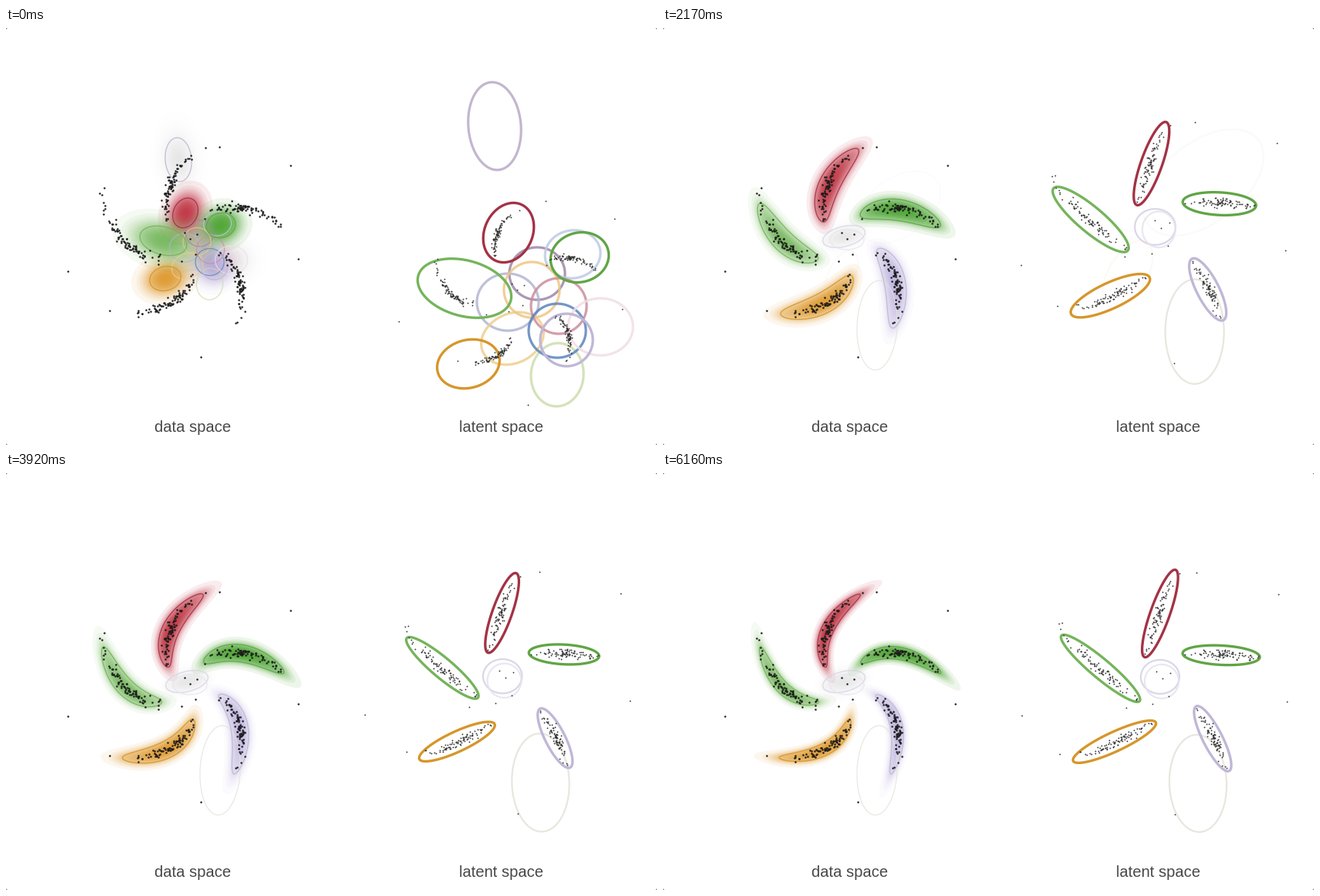
Recreate the animation shown at these times as a matplotlib script. Size 842x540 px, loop 6230 ms.

```python
import numpy as np
import matplotlib.pyplot as plt
from matplotlib.animation import FuncAnimation
from matplotlib.collections import PolyCollection
from matplotlib.colors import to_rgb
from matplotlib.patches import Polygon

# Plane points are complex numbers, x + iy with y pointing down.
W, H, DPI = 842, 540, 100
FRAMES, STEP = 89, 70
SETTLE = 18                      # frames of the fast first phase
PX = 72 / DPI
DATA = 237 + 280j                # hub of the pinwheel
LATENT = np.array([660 + 346j, 640 + 252j, 645 + 274j])  # its begin, fit, end
LEVELS = 24
RADII = np.sqrt(-2 * np.log((np.arange(LEVELS) + .5) / LEVELS))
CIRCLE = np.exp(1j * np.linspace(0, 2 * np.pi, 64, endpoint=False))
rng = np.random.default_rng(7)


def turn(degrees):
    return np.exp(1j * np.radians(degrees))


def mix(a, b, k):
    return a + (b - a) * k


def xy(z):
    return np.column_stack([z.real, z.imag])


def clock(frame):
    """Weights of the quick fit, the slow drift after it, and the time left over."""
    fit = 1 - max(0, 1 - frame / SETTLE) ** 2.2
    late = max(0, frame - SETTLE)
    return fit, 1 - np.exp(-late / 12), late / (FRAMES - 1 - SETTLE)


def spiral(r, arm=0):
    """Pinwheel offset from the hub at radius r."""
    return r * turn(-156 + .6 * r + 72 * arm)


def ellipse(cx, cy, a, b, degrees=0):
    return np.array([cx, cy, a, b, degrees], float)


def spine(e):
    """Ellipse as inner end, middle, outer end and half width."""
    mid, axis = e[0] + 1j * e[1], e[2] * turn(e[4])
    return np.array([mid - axis, mid, mid + axis, e[3]])


def halved(e):
    """Data-space image of a starting ellipse in latent space."""
    mid = DATA + (e[0] + 1j * e[1] - LATENT[0]) / 2
    return ellipse(mid.real, mid.imag, e[2] / 2, e[3] / 2, e[4])


def banana(row, r=1, stretch=1):
    """Ellipse of relative size r, bent along its spine."""
    p0, pm, p1, width = row
    half, bow = (p1 - p0) / 2, (p0 + p1) / 2 - pm
    u = (min(r, 1) + stretch * max(r - 1, 0)) * CIRCLE.real
    tangent = half + 2 * u * bow
    normal = 1j * tangent / (abs(tangent) + 1e-9)
    return xy(pm + u * half + u ** 2 * bow + width * r * CIRCLE.imag * normal)


class Arm:
    """One blade of the pinwheel with the component that fits it."""
    count = 86

    def __init__(self, k, ink, fill, peak, begin, fit, end, size, angle):
        self.k, self.ink, self.fill, self.peak = k, to_rgb(ink), to_rgb(fill), peak
        a, b = size
        self.poses = ellipse(*begin), ellipse(*fit, a, b, angle), ellipse(*end, a, 12.5, angle)
        r = np.clip(rng.normal(83, 20, self.count), 40, 146)
        self.noise = rng.normal(0, 3, (2, self.count))
        shape = spiral(r, k) + self.noise[0] + 1j * self.noise[1]
        mid = spiral(82, k)
        self.data = DATA + shape
        self.begin = LATENT[0] + 1.03 * mix(mid, shape, .62)
        self.u = (r - 81) / 44

    def latent(self, fit, drift, late):
        e = mix(mix(*self.poses[:2], fit), self.poses[2], drift)
        e[2] *= 1 - .09 * np.sin(np.pi * late)
        return e

    def points(self, e, fit):
        v = .3 * e[3] * (self.u ** 2 - .4) + self.noise[0]
        v += 150 * np.maximum(0, self.u - .95) ** 2
        goal = e[0] + 1j * e[1] + (e[2] * self.u + 1j * v) * turn(e[4])
        return mix(self.begin, goal, fit)

    def shape(self, fit, drift, late):
        """Data-space spine: a blob, then a straight blade that bends."""
        p0, pm, p1 = (DATA + spiral(r, self.k) for r in (39, 81, 124))
        chord = (p0 + p1) / 2
        bend = mix(.25, 1, drift)
        shift = (1 - bend) * .5 * (pm - chord)
        blade = np.array([p0, mix(chord, pm, bend), p1, 0]) + shift
        blade[3] = mix(15, 8, late)
        return mix(spine(halved(self.poses[0])), blade, fit)


class Ghost:
    """Weak component: fades at once, after the fit, or stays."""

    def __init__(self, c0, begin, c1=None, fit=(640, 252, 36, 34), end=None,
                 data=(240, 268, 18, 17), peak=.12):
        self.c0, self.c1 = np.array(to_rgb(c0)), np.array(to_rgb(c1 or c0))
        self.begin, self.fit, self.data = (ellipse(*e) for e in (begin, fit, data))
        self.end = ellipse(*(end or fit))
        self.brief, self.stays, self.peak = c1 is None, end is not None, peak

    def state(self, fit, drift, late):
        alpha = .85
        if self.brief:
            alpha *= max(0, 1 - fit / .85)
        elif not self.stays:
            alpha *= max(0, 1 - 1.2 * drift)
        return (mix(mix(self.begin, self.fit, fit), self.end, drift),
                mix(halved(self.begin), self.data, fit),
                mix(self.c0, self.c1, fit), alpha)


arms = [
    Arm(0, '#a33245', '#c02a3a', .88, (650, 265, 40, 31, -65),
        (610, 163), (643, 182), (60, 16), -70.5),
    Arm(1, '#60a545', '#46a42a', .9, (742, 297, 38, 32, -15),
        (715, 211), (722, 236), (50, 19), 3),
    Arm(2, '#c0b7d6', '#b0a0da', .68, (725, 404, 34, 34, 62),
        (692, 328), (711, 344), (47, 18), 63),
    Arm(3, '#d6962a', '#e0941c', .86, (598, 435, 41, 31, 165),
        (568, 344), (584, 348), (59, 25), 155),
    Arm(4, '#74b45a', '#60b042', .78, (593, 337, 62, 36, 195),
        (528, 238), (566, 253), (66, 24), 220),
]
ghosts = [
    # far tail, hub, its twin, pale orange, wide one
    Ghost('#cdddae', (713, 449, 41, 34, -85), '#e3e3da', (679, 376, 77, 40, -86),
          (692, 402, 63, 37, -92), (277, 385, 58, 26, -87), .03),
    Ghost('#9d86a8', (687, 318, 36, 34), '#d5cfe4', (624, 245, 29, 26),
          (643, 264, 25, 22), (234, 270, 28, 13, -14), .32),
    Ghost('#b3b5d2', (649, 355, 40, 37), '#e6e3ee', (634, 243, 20, 26),
          (645, 270, 22, 22), (238, 274, 22, 13), 0),
    Ghost('#efce90', (655, 402, 42, 32, -25), '#f4dfc6', (601, 319, 48, 25, -60),
          data=(231, 320, 34, 17, -65)),
    Ghost('#bdcbe2', (733, 293, 36, 31, -10), '#e9e7ea', (699, 200, 90, 52, -38),
          data=(305, 232, 60, 38, -35), peak=0),
    # dropped during the fit
    Ghost('#b9aac8', (632, 127, 57, 34, 85), peak=.3),
    Ghost('#efc684', (680, 339, 36, 36)),
    Ghost('#cc8d9c', (715, 360, 36, 36), peak=.2),
    Ghost('#5b84bd', (713, 392, 37, 35)),
    Ghost('#f0dfe6', (769, 387, 42, 37), peak=.4),
]

# far outliers and the few points around the hub
loose = np.array([39 - 126j, 131 - 102j, -157 + 35j, 141 + 19j, 15 + 146j,
                  -6 - 15j, 10 - 13j, 1 - 7j, 8 + 13j, -10 + 22j, -40 + 26j])

fig = plt.figure(figsize=(W / DPI, H / DPI), dpi=DPI, facecolor='white')
ax = fig.add_axes([0, 0, 1, 1])
ax.set(xlim=(0, W), ylim=(H, 0))
ax.axis('off')

for x, dx in ((0, 2), (W, -2)):
    for y, dy in ((0, 2), (H, -2)):
        ax.add_patch(Polygon([(x, y), (x + dx, y), (x, y + dy)], fc='#8a8a8a', lw=0))

for x, label in ((242, 'data space'), (640, 'latent space')):
    ax.text(x, 523, label, ha='center', va='baseline', color='#484848',
            family='Liberation Sans', size=20.2 * PX)

fills = PolyCollection([], linewidths=0, zorder=1)
lines = PolyCollection([], facecolors='none', zorder=2)
for c in (fills, lines):
    ax.add_collection(c, autolim=False)


def dots(z, size, color):
    return ax.scatter(z.real, z.imag, s=(size * PX) ** 2, c=color, lw=0, zorder=3)


dots(np.concatenate([a.data for a in arms] + [DATA + loose]), 2.5, '#1c1c1c')
latent_dots = dots(np.zeros(1, complex), 1.8, '#303030')


def draw(frame):
    now = fit, drift, late = clock(frame)
    sigma, stretch = mix(.78, .62, fit) + .1 * late, mix(1, .4, fit)
    shades, strokes, cloud = [], [], []

    def shade(row, color, peak, size, reach):
        rgba = (*color, 1 - (1 - peak) ** (1 / LEVELS))
        shades.extend((banana(row, size * r, reach), rgba) for r in RADII)

    def outline(row, color, alpha, width):
        strokes.append((banana(row), (*color, alpha), width * PX))

    for g in ghosts:
        latent, data, color, alpha = g.state(*now)
        if alpha > 0:
            if g.peak:
                shade(spine(data), color, g.peak * alpha, sigma, stretch)
            outline(spine(data), color, alpha * .9, 1.3)
            outline(spine(latent), color, alpha, mix(3.2, 2.2, fit))

    for a in arms:
        row, e = a.shape(*now), a.latent(*now)
        shade(row, a.fill, a.peak, sigma, stretch)
        outline(row, a.ink, .85, 1.4)
        outline(spine(e), a.ink, 1, 3.3)
        cloud.append(a.points(e, fit))

    hub = mix(mix(*LATENT[:2], fit), LATENT[2], drift)
    cloud.append(hub + loose * mix(.97, 1.15, fit))

    verts, colors = zip(*shades)
    fills.set_verts(verts)
    fills.set_facecolor(colors)
    verts, colors, widths = zip(*strokes)
    lines.set_verts(verts)
    lines.set_edgecolor(colors)
    lines.set_linewidth(widths)
    latent_dots.set_offsets(xy(np.concatenate(cloud)))
    return fills, lines, latent_dots


anim = FuncAnimation(fig, draw, frames=FRAMES, interval=STEP, repeat=True,
                     init_func=lambda: draw(0))
plt.show()
```
